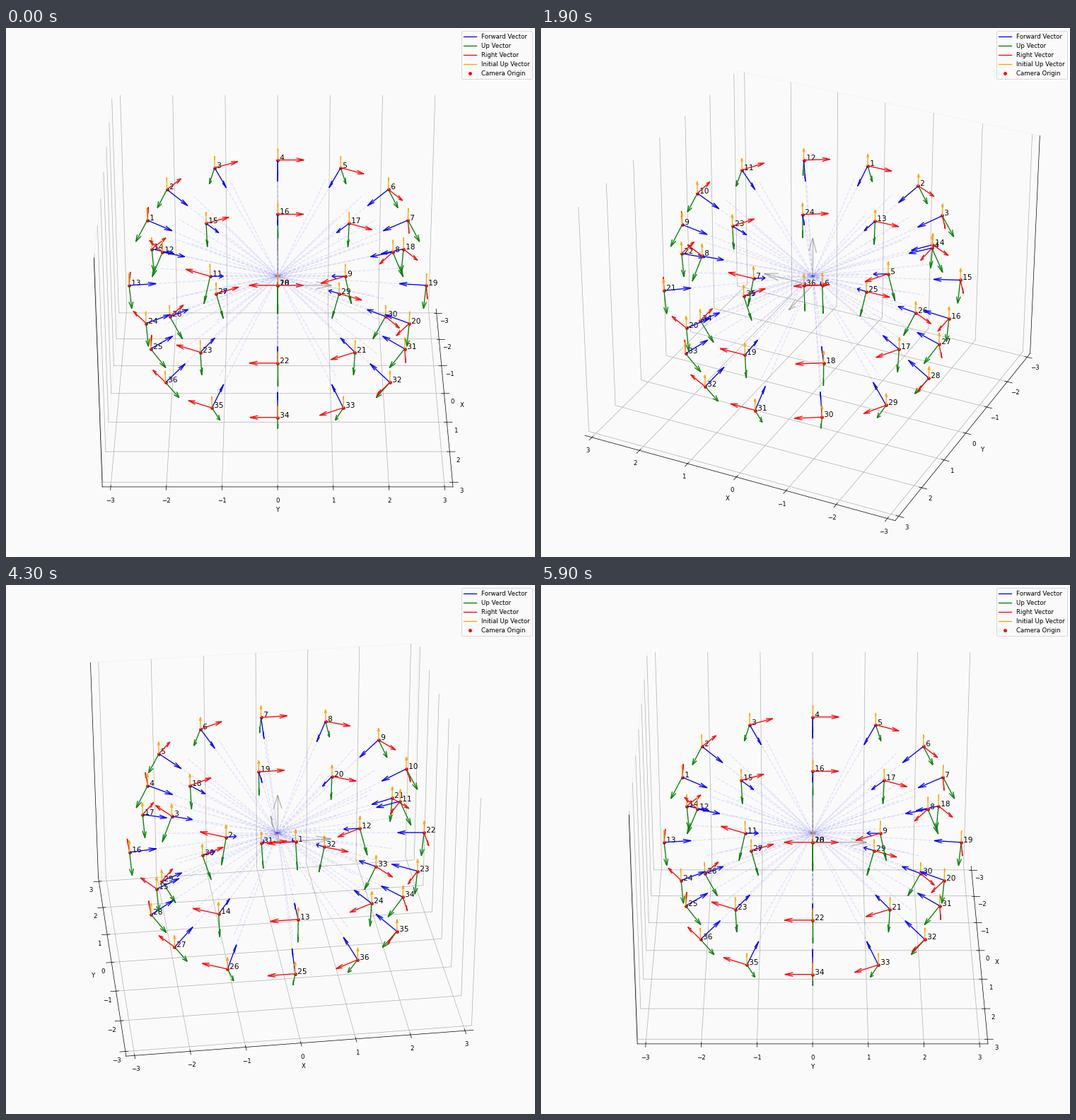
These frames come from a looping animation (748x748 px, 6000 ms). A matplotlib script:

```python
import numpy as np
import matplotlib.pyplot as plt
from matplotlib.animation import FuncAnimation
from matplotlib.lines import Line2D
from mpl_toolkits.mplot3d.art3d import Line3DCollection

FRAMES = 60
RADIUS = 2.75
LIMIT = 1.1 * RADIUS * 25 / 24
TARGET = np.array([0, 0, 0.2])
UP = np.array([0, 0, 1.0])
HEAD_ANGLE = np.radians(15)

BG = '#fafafa'
plt.rcParams.update({'figure.facecolor': BG, 'axes.facecolor': BG,
                     'font.family': 'DejaVu Sans', 'font.size': 10})

fig = plt.figure(figsize=(12, 12), dpi=748 / 12)
ax = fig.add_axes([0, 0, 1, 1], projection='3d')


def unit(v):
    return v / np.linalg.norm(v)


def arrow(start, vec):
    """Shaft and two head strokes as 3D segments."""
    tip = start + vec
    flat = np.hypot(vec[0], vec[1])
    if flat > 1e-9:
        axis = np.array([vec[1], -vec[0], 0]) / flat
    else:
        axis = np.array([0, 1.0, 0])
    side = np.cross(axis, vec) * np.sin(HEAD_ANGLE)
    back = vec * np.cos(HEAD_ANGLE)
    return [(start, tip)] + [(tip, tip - 0.3 * (back + s * side)) for s in (1, -1)]


def add_arrows(start, vecs, colors, **style):
    segments = [seg for v in vecs for seg in arrow(start, v)]
    ax.add_collection3d(Line3DCollection(
        segments, colors=np.repeat(colors, 3), linewidths=1.5, **style))


def add_camera(number, pos):
    forward = unit(TARGET - pos)
    right = unit(np.cross(UP, forward))
    up = np.cross(right, forward)

    ax.plot(*np.array([pos, pos + 5 * forward]).T, color='blue', ls='--',
            lw=1.5, alpha=0.1)
    ax.scatter(*pos, color='red', s=20, depthshade=False)
    add_arrows(pos, [0.5 * up, 0.5 * forward, 0.5 * right, 0.25 * UP],
               ['green', 'blue', 'red', 'orange'])
    ax.text(*pos, f' {number}', size=12)


add_arrows(np.zeros(3), np.eye(3), ['gray'] * 3, alpha=0.55)

number = 1
for tilt in np.radians([30, 0, -30]):
    for turn in np.radians(-90 - 30 * np.arange(12)):
        add_camera(number, RADIUS * np.array([np.cos(tilt) * np.cos(turn),
                                              np.cos(tilt) * np.sin(turn),
                                              np.sin(tilt)]))
        number += 1

ax.set_xticks(range(-3, 4))
ax.set_yticks(range(-3, 4))
ax.set_zticks([])
ax.set(xlim=(-LIMIT, LIMIT), ylim=(-LIMIT, LIMIT),
       zlim=(-0.75 * LIMIT, 0.75 * LIMIT), xlabel='X', ylabel='Y')

# Only the wall across y keeps a faint outline.
ax.xaxis.pane.set_visible(False)
ax.zaxis.pane.set_visible(False)
ax.yaxis.pane.set_fill(False)
ax.yaxis.pane.set_edgecolor('#ececec')

handles = [Line2D([], [], color=color, lw=1.5, label=f'{name} Vector')
           for name, color in (('Forward', 'blue'), ('Up', 'green'),
                               ('Right', 'red'), ('Initial Up', 'orange'))]
handles.append(Line2D([], [], color='red', marker='o', ls='', ms=4.5, mew=1,
                      label='Camera Origin'))
fig.legend(handles=handles, loc='upper right', labelspacing=0.46)


def update(i):
    # The tiny offset avoids an ambiguous edge-on choice of back wall.
    ax.view_init(elev=30, azim=360 * i / (FRAMES - 1) % 360 + 1e-3)
    return []


anim = FuncAnimation(fig, update, frames=FRAMES, init_func=lambda: update(0),
                     interval=100, repeat=True, repeat_delay=0)
plt.show()
```
